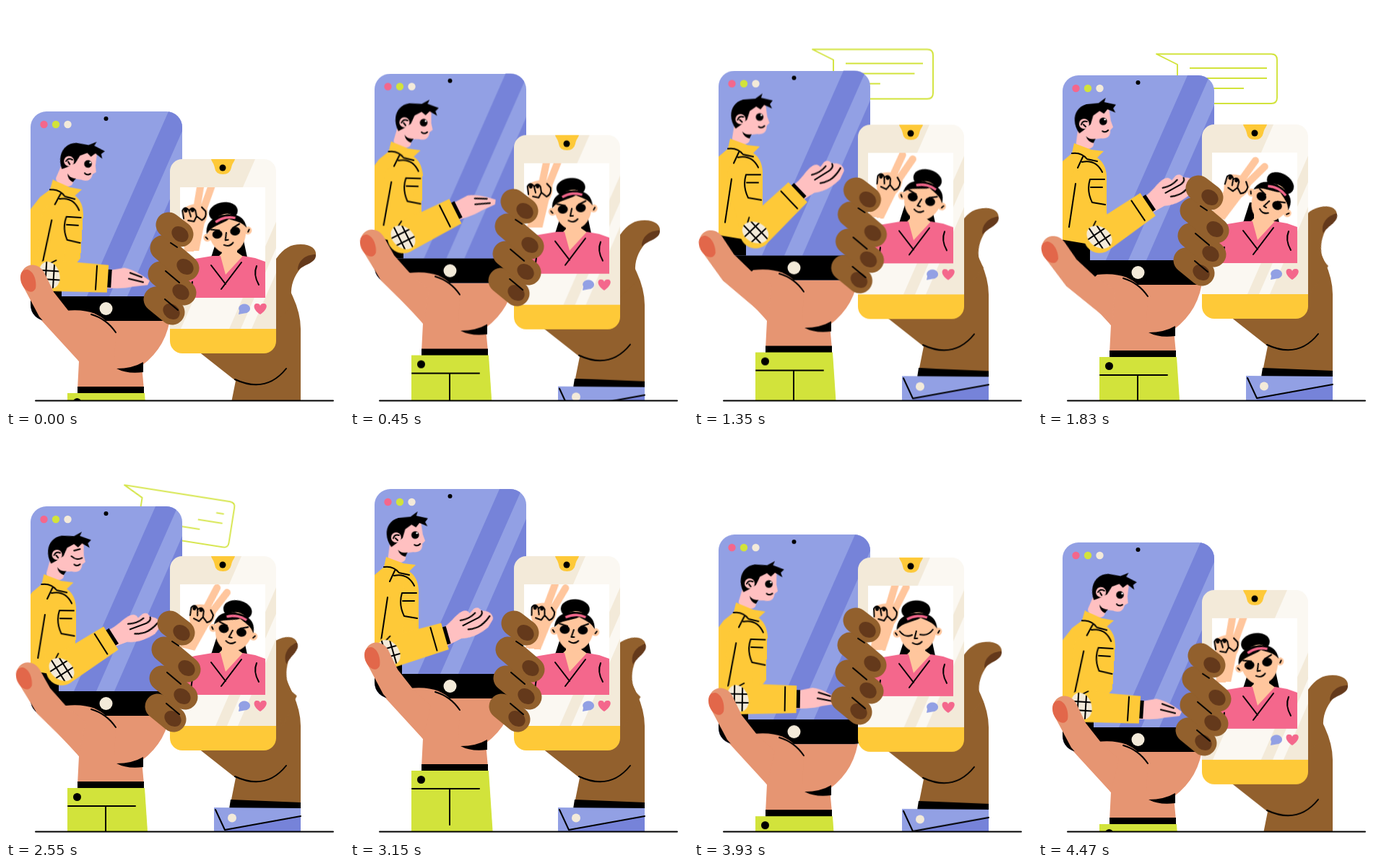
An HTML page without scripts that plays this animation: 468 px wide and 558 px high, repeating every 4.5 s.

```html
<!DOCTYPE html>
<html lang="en">
<head>
<meta charset="utf-8">
<title>Video call</title>
<style>
html, body { margin: 0; width: 100%; height: 100%; overflow: hidden; background: #fff; }
svg { display: block; width: 468px; height: 558px; }
.ink { fill: none; stroke: #000; stroke-width: 2; stroke-linecap: round; stroke-linejoin: round; }
.blue { fill: #92a0e4; } .deep { fill: #7683d9; }
.lime { fill: #d2e33b; } .cream { fill: #f3ead9; } .shine { fill: #fbf8f2; }
.pink { fill: #f4678c; } .gold { fill: #fec938; }
.peach { fill: #e69572; } .rose { fill: #ffc0c1; } .tan { fill: #ffc69d; }
.brown { fill: #92602d; } .nail { fill: #64391b; }

g, path, ellipse { animation: 4.5s infinite ease-in-out; }

/* joint angles: --a at the loop point, then --b to --f */
.joint { animation-name: pose; }
@keyframes pose {
  0%, 100% { transform: rotate(var(--a)); }
  19.3% { transform: rotate(var(--b)); }
  40.7% { transform: rotate(var(--c)); }
  56.7% { transform: rotate(var(--d)); }
  70% { transform: rotate(var(--e)); }
  87.3% { transform: rotate(var(--f)); }
}
.torso { transform-origin: 50px 330px; --a: 3.6deg; --b: 0deg; --c: 0deg; --d: .6deg; --e: 0deg; --f: 2deg; }
.head { transform-origin: 68px 100px; --a: 10deg; --b: 0deg; --c: -2deg; --d: 5deg; --e: -2deg; --f: 5deg; }
.upper { transform-origin: 62px 120px; --a: 17deg; --b: 0deg; --c: 0deg; --d: 5deg; --e: 17deg; --f: 15deg; }
.fore { transform-origin: 85px 224px; --a: -17deg; --b: -53deg; --c: -34deg; --d: -38deg; --e: -33deg; --f: -16deg; }
.wrist { transform-origin: 167px 224px; --a: -4deg; --b: 18deg; --c: 5deg; --d: 12deg; --e: -11deg; --f: -4deg; }
.left-thumb { transform-origin: 92px 332px; --a: 0deg; --b: -6.5deg; --c: -9deg; --d: -3.5deg; --e: 0deg; --f: 0deg; }
.right-thumb { transform-origin: 385px 190px; --a: 0deg; --b: 0deg; --c: -14deg; --d: -23deg; --e: -18deg; --f: -3deg; }
.face { transform-origin: 307px 125px; --a: -10deg; --b: 0deg; --c: 30deg; --d: 12deg; --e: 2deg; --f: -3deg; }
.wave { transform-origin: 252px 110px; --a: -4deg; --b: 0deg; --c: 22deg; --d: 14deg; --e: 7deg; --f: 3deg; }

.left { animation-name: left; }
@keyframes left {
  0%, 100% { transform: translateY(146px); }
  16%, 24.7% { transform: translateY(72px); }
  33%, 57% { transform: translateY(96px); }
  68% { transform: translateY(72px); }
  72% { transform: translateY(72px); animation-timing-function: cubic-bezier(.3, .05, .35, 1); }
  97% { transform: translateY(146px); }
}
.right { animation-name: right; }
@keyframes right {
  0%, 100% { transform: translateY(212px); }
  16% { transform: translateY(165px); }
  40% { transform: translateY(164px); }
  56%, 85.3% { transform: translateY(165px); }
}
.glare { animation-name: glare; }
@keyframes glare {
  0%, 100% { transform: translateX(18px); }
  19.3%, 70% { transform: none; }
  87.3% { transform: translateX(16px); }
}
.glare2 { animation-name: glare2; }
@keyframes glare2 {
  0%, 100% { transform: translateX(19px); }
  16%, 85.3% { transform: none; }
}
.finger { animation-name: grip; }
@keyframes grip {
  0%, 100% { transform: translate(-2px, calc(var(--n) * -4px + 2px)); }
  19.3%, 56.7%, 70% { transform: none; }
  40.7% { transform: translate(-5px, calc(var(--n) * -5px)); }
  87.3% { transform: translate(-3px, calc(var(--n) * -2px - 4px)); }
}
.bubble { transform-origin: 164px -29.5px; animation-name: bubble; animation-timing-function: linear; }
@keyframes bubble {
  0%, 13.3% { transform: rotate(-60deg) scale(0); }
  19.3% { transform: rotate(-10deg) scale(.87); }
  24%, 44% { transform: none; }
  51% { transform: rotate(-5deg); }
  56.7% { transform: rotate(9deg) scale(.93); }
  60% { transform: rotate(25deg) scale(.5); }
  63%, 100% { transform: rotate(60deg) scale(0); }
}
.line { stroke-dasharray: 1 1; animation-name: write; animation-timing-function: linear; animation-fill-mode: backwards; }
@keyframes write {
  0%, 22% { stroke-dashoffset: 1; }
  29%, 50% { stroke-dashoffset: 0; }
  57.5%, 100% { stroke-dashoffset: -1; }
}
.open, .shut, .reach, .cup { animation-timing-function: step-end; }
.open { animation-name: open; }
.shut { animation-name: shut; }
@keyframes open { 0% { opacity: 0; } 4%, 100% { opacity: 1; } }
@keyframes shut { 0% { opacity: 1; } 4%, 100% { opacity: 0; } }
.him { animation-delay: -2.05s; }
.her { animation-delay: -.66s; }
.reach { animation-name: reach; }
.cup { animation-name: cup; }
@keyframes reach { 0%, 82% { opacity: 1; } 11% { opacity: 0; } }
@keyframes cup { 0%, 82% { opacity: 0; } 11% { opacity: 1; } }
</style>
</head>
<body>
<svg viewBox="0 0 468 558">
<defs>
  <clipPath id="floor"><path d="M0 0H468V546H0Z"/></clipPath>
  <clipPath id="left-case"><rect x="34" width="210" height="290" rx="22"/></clipPath>
  <clipPath id="right-case"><rect x="227" width="147" height="269" rx="17"/></clipPath>
  <clipPath id="left-screen"><path d="M34 0H244V256H34Z"/></clipPath>
  <clipPath id="right-screen"><path d="M241 39H359V192H241Z"/></clipPath>
  <clipPath id="patch"><ellipse rx="19" ry="14" transform="rotate(68)"/></clipPath>
</defs>

<g clip-path="url(#floor)">
<g class="left">
  <g class="bubble" fill="none" stroke="#d2e33b" stroke-width="1.9" stroke-linejoin="round">
    <path d="M164-29.500H323q8 0 8 8V31q0 8-8 8H201q-8 0-8-8V-15Z"/>
    <path class="line" pathLength="1" d="M210-10H317"/>
    <path class="line" pathLength="1" d="M210 4H317" style="animation-delay:.08s"/>
    <path class="line" pathLength="1" d="M210 18H285" style="animation-delay:.16s"/>
  </g>

  <path class="peach" d="M45 285L101 346 99 385H191L188 352Q224 325 228 280Z"/>
  <path d="M153 356Q175 356 190 347V361Q168 364 153 356ZM99 381H191V391H99Z"/>
  <path class="lime" d="M85 390H192L198 480H85Z"/>
  <path class="ink" d="M86 415H179M138 415V465"/>
  <circle cx="98.500" cy="402.500" r="5.500"/>

  <g clip-path="url(#left-case)">
    <path class="blue" d="M34 0H244V290H34Z"/>
    <g class="glare deep">
      <path d="M207 0H238L125 256H94ZM262 0H400V256H150Z"/>
    </g>
    <g clip-path="url(#left-screen)">
      <g class="joint torso">
        <path d="M0 215L72 228V300H0Z"/>
        <g class="joint head">
          <path class="rose" d="M60 55L100 46 102 64 105 73 101 77C101 86 96 89 88 88L78 89 77 97C74 106 52 102 53 93L57 70Z"/>
          <path d="M67 84Q72 90 80 88L77 94Q69 92 67 84Z"/>
          <path d="M58 80C48 66 50 45 69 40L86 39 96 32 94 38 110 42 106 47 109 53 98 48 93 54 87 50 78 56 74 68 64 76Z"/>
          <circle class="rose" cx="65" cy="67" r="7"/>
          <path class="ink" d="M61 68q2-6 8-4m-5 4l3 3M90 78q4 3 8-1"/>
          <g class="open him"><circle cx="91.500" cy="64.500" r="5.300"/><circle cx="94" cy="62" r="1.300" fill="#fff"/></g>
          <path class="ink shut him" d="M85 67q8 6 15 1M88 59l8-3"/>
        </g>
        <path class="gold" d="M50 94L74 103 91 105 82 114Q94 122 95 140L95 200 72 234 0 222V175L14 148 34 119 47 108Z"/>
        <g class="joint upper">
          <path d="M65 145L82 218" fill="none" stroke="#fec938" stroke-width="38" stroke-linecap="round"/>
        </g>
        <path class="ink" d="M47 108Q60 106 68 116L82 119M62 113L55 128M52 150L43 210M61 120Q80 116 89 134M92 144H72Q67 160 75 176L93 179M73 155H89"/>
        <g class="joint upper">
          <g class="joint fore">
            <g class="joint wrist"><g transform="translate(167 224)">
              <path class="rose reach" d="M-4-11L22-15C34-13 45-6 57 3L54 9 34 11C22 14 10 13-4 13Z"/>
              <path class="ink reach" d="M28 0L48 5M30-8L46-2"/>
              <g class="cup">
                <path class="rose" d="M-4-11C14-12 24-20 36-20Q43-20 44-13L52-16Q59-17 60-9L66-5Q73 2 69 9L58 16C44 19 30 19 18 13L-4 13Z"/>
                <path class="ink" d="M28-10q12 4 23 0M28-2H52q8-1 8-6M32 6C44 12 56 9 67 3"/>
              </g>
            </g></g>
            <path d="M163 211H171V236H163Z"/>
            <path class="gold" d="M82 203L166 205V243L88 246A21 21 0 0 1 82 203Z"/>
            <path class="ink" d="M150 207V240M93 203L86 207"/>
            <g transform="translate(85 224)">
              <ellipse class="cream" rx="19" ry="14" transform="rotate(68)"/>
              <path class="ink" clip-path="url(#patch)" d="M-19-6H19M-19 6H19M-5-19V19M6-19V19"/>
            </g>
          </g>
        </g>
      </g>
    </g>
    <path d="M34 256H244V290H34Z"/>
    <circle class="cream" cx="138.500" cy="273" r="9"/>
    <circle cx="138.500" cy="10" r="3"/>
    <circle class="pink" cx="52.500" cy="18" r="5.200"/>
    <circle class="lime" cx="69" cy="18" r="5.200"/>
    <circle class="cream" cx="85.500" cy="18" r="5.200"/>
  </g>

  <path class="peach" d="M82 276C112 273 128 280 139 291L152 308 150 346H101L62 296Z"/>
  <path class="ink" d="M118 281Q139 287 152 306"/>
  <g class="joint left-thumb">
    <path class="peach" d="M21 237C16 212 42 204 53 223L66 250 88 278 112 300 101 345 46 284Z"/>
    <path fill="#e2674a" d="M22 239C17 226 22 218 30 219 38 221 43 234 41 245 37 254 26 249 22 239Z"/>
  </g>
</g>

<g class="right">
  <path class="brown" d="M252 255L318 307 311 342H408V235Q408 214 397 190L374 140 300 150Z"/>
  <path class="ink" d="M317 305Q360 325 388 290"/>
  <g class="joint right-thumb">
    <path class="brown" d="M365 150L374 138C385 123 394 118 408 118 423 118 430 125 429 133 427 141 415 144 408 151 399 162 394 174 395 190L400 200 366 232Z"/>
    <path class="nail" d="M404 154C404 141 414 132 429 132 430 144 414 145 404 154Z"/>
  </g>
  <path d="M311 337L408 341V350H309Z"/>
  <path class="blue" d="M288 348L408 349V395H288Z"/>
  <path class="deep" d="M303 379L408 360V395H303Z"/>
  <path class="ink" d="M290 351L303 379 408 360"/>
  <circle class="cream" cx="313" cy="362.500" r="6"/>

  <g clip-path="url(#right-case)">
    <path class="cream" d="M227 0H374V269H227Z"/>
    <g class="glare2 shine">
      <path d="M326 0H393L290 235H223ZM409 0H424L321 235H306Z"/>
    </g>
    <path class="gold" d="M227 235H374V269H227ZM284 0H317C316 4 313 6 312 12Q310 21 300.500 21 290 21 289 12C288 6 285 4 284 0Z"/>
    <circle cx="300" cy="12" r="4.500"/>
    <path fill="#fff" d="M241 39H359V192H241Z"/>
    <path class="blue" d="M323 210A8 6.500 0 1 1 330 213.500L322 215Z"/>
    <path class="pink" d="M352 215C340 207 343 199 348 200Q351 200 352 203 353 200 356 200C362 199 364 207 352 215Z"/>

    <g clip-path="url(#right-screen)">
      <path d="M293 108L284 136H334L328 108Z"/>
      <path class="tan" d="M299 108H320V129L330 136 304 166 292 137 299 130Z"/>
      <path class="pink" d="M241 143L262 138 286 134H297L304 160 328 134 345 137 359 142V192H241Z"/>
      <path class="ink" d="M326 143L298 180M284 147L304 173M347 148Q342 160 350 174M258 170L256 184"/>
      <g class="joint face">
        <ellipse cx="310" cy="73" rx="20" ry="13.500"/>
        <circle class="tan" cx="282" cy="104" r="5.500"/>
        <circle class="tan" cx="339" cy="104" r="5.500"/>
        <path class="tan" d="M284 92C284 118 296 131 310 131S337 118 337 95Q325 75 310 76 295 78 284 92Z"/>
        <path d="M282 99C283 82 296 77 310 77 327 77 338 84 338 100 333 91 324 88 316 84 304 90 292 88 282 99Z"/>
        <path d="M297 85Q311 78 325 84" fill="none" stroke="#f4678c" stroke-width="3.500"/>
        <g class="open her">
          <ellipse cx="296.500" cy="102" rx="7" ry="6"/><ellipse cx="321.500" cy="102" rx="7" ry="6"/>
          <path class="ink" d="M289 94l11 3M329 93l-10 4"/>
        </g>
        <path class="ink shut her" d="M286 101q7 10 17 6M314 107q11 3 18-6"/>
        <path class="ink" d="M309 102L306 112h4M303 118q7 5 13-1M280 103l2 3M341 103l-2 3"/>
      </g>
      <g class="joint wave">
        <g transform="translate(4 3)">
          <path d="M263 66L271 33M272 68L286 36" fill="none" stroke="#ffc69d" stroke-width="10" stroke-linecap="round"/>
          <path class="tan" d="M241 125L246 88Q239 70 246 64 262 56 276 64 281 74 272 88L262 125Z"/>
          <path class="ink" d="M244 79L243 68q4-7 9 0l2 9M252 69q5-7 9 0l1 9M250 82l8 2 4-7 7 6q7-3 6-12l-5-6"/>
          <ellipse cx="247.500" cy="68" rx="2.500" ry="3"/><ellipse cx="257" cy="68" rx="2.500" ry="3"/>
        </g>
      </g>
    </g>
  </g>

  <g fill="none" stroke="#92602d" stroke-width="35" stroke-linecap="round">
    <g class="finger" style="--n:4">
      <path d="M210 208L232 226"/>
      <ellipse class="nail" stroke="none" cx="231" cy="225" rx="12.500" ry="10" transform="rotate(38 231 225)"/>
    </g>
    <g class="finger" style="--n:3">
      <path d="M216 169L248 195"/>
      <ellipse class="nail" stroke="none" cx="244" cy="194" rx="12.500" ry="10" transform="rotate(38 244 194)"/>
      <path class="ink" d="M222 204L240 219"/>
    </g>
    <g class="finger" style="--n:2">
      <path d="M219 129L252 157"/>
      <ellipse class="nail" stroke="none" cx="250" cy="155" rx="12.500" ry="10" transform="rotate(38 250 155)"/>
      <path class="ink" d="M223 161L242 177"/>
    </g>
    <g class="finger" style="--n:1">
      <path d="M227 93L244 106"/>
      <ellipse class="nail" stroke="none" cx="243" cy="106" rx="12.500" ry="10" transform="rotate(38 243 106)"/>
      <path class="ink" d="M230 118L239 124"/>
    </g>
  </g>
</g>
</g>
<path class="ink" d="M41 546.500H453"/>
</svg>
</body>
</html>
```
